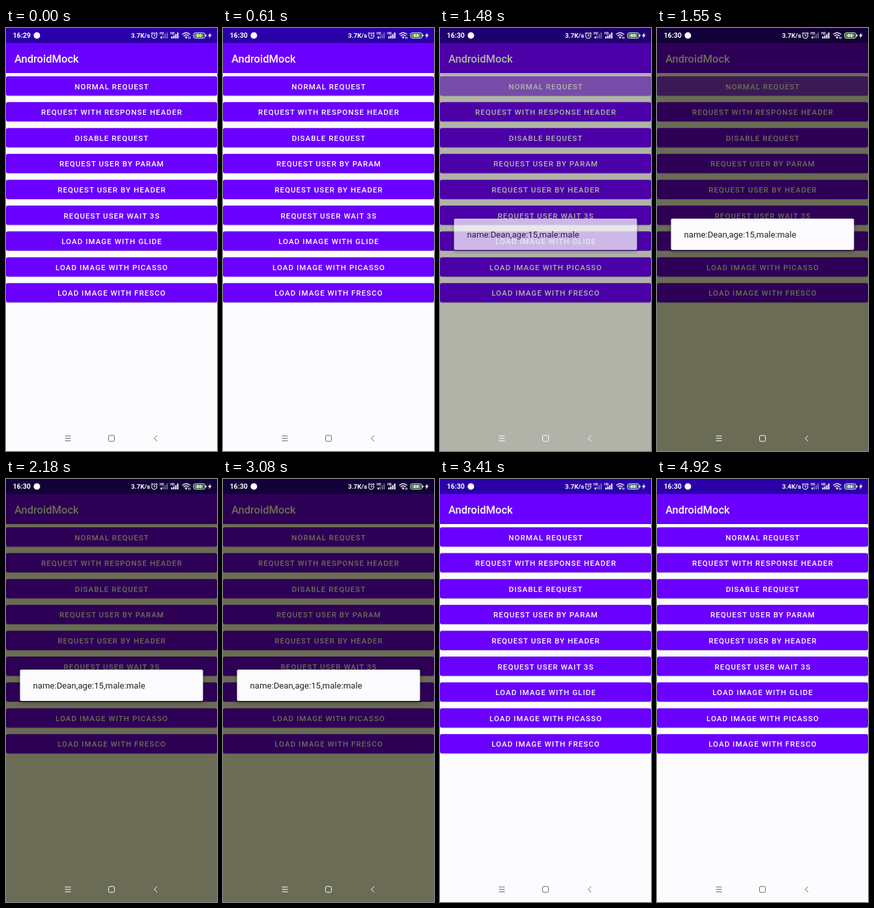
Recreate the animation shown at these times as an HTML page. Size 324 px wide and 648 px high, loop 4.97 s.

```html
<!DOCTYPE html>
<html lang="en">
<head>
<meta charset="utf-8">
<title>AndroidMock</title>
<style>
  html, body { margin: 0; width: 100%; height: 100%; overflow: hidden; background: #fcfcff; }
  svg { display: block; width: 324px; height: 648px; font-family: Roboto, Inter, sans-serif; }
  #dim { mix-blend-mode: multiply; }
  #dialog { filter: drop-shadow(0 2px 3px rgba(0, 0, 0, .45)); }
  .label { font-size: 11.55px; font-weight: 500; letter-spacing: 1.03px; text-anchor: middle; fill: #fff; }
  .line { fill: none; stroke: #fff; }
</style>
</head>
<body>
<svg viewBox="0 0 324 648">
  <rect width="324" height="648" fill="#fcfcff"/>
  <rect y="23" width="324" height="46" fill="#6a00ff"/>
  <rect width="324" height="23" fill="#2a00a8"/>
  <text x="13" y="52.5" font-size="16.5" font-weight="500" fill="#fff">AndroidMock</text>
  <g id="buttons"></g>
  <rect id="dim" width="324" height="648"/>

  <g fill="#fff">
    <text id="clock" x="10.5" y="15.3" font-size="10.6" font-weight="700"></text>
    <circle cx="47.4" cy="11.5" r="5"/>
    <text id="speed" x="192" y="15" font-size="9.9" font-weight="700"></text>
    <g class="line" stroke-width="1.1">
      <circle cx="227.7" cy="11.8" r="4"/>
      <path d="M227.7 9.3v2.7h2M222.7 8.6l2.4-2M232.7 8.6l-2.4-2"/>
    </g>
    <g id="signals"></g>
    <g class="line" stroke-width="1.4">
      <path d="M270.6 9.7q6-5 12 0M272.7 12.1q3.9-3.1 7.8 0"/>
      <path d="M274.7 14.3q1.9-1.4 3.8 0"/>
    </g>
    <path d="M274.9 14.4h3.4l-1.7 2.1zM280 13.5h1v3h-1zM282 13.5h1v3h-1z"/>
    <rect class="line" x="288" y="7.5" width="17.5" height="8" rx="2.3"/>
    <rect x="289.5" y="9" width="14" height="5" rx="1" fill="#58b83c"/>
    <rect x="306.3" y="9.7" width="1.3" height="3.6" rx=".6"/>
    <text x="296.6" y="14.1" font-size="7" font-weight="700" text-anchor="middle">86</text>
    <path d="M314 7l-4 5.2h2.5l-1 3.8 4.4-5.4h-2.6z"/>
  </g>

  <g id="nav" fill="none">
    <path d="M90.5 625h9M90.5 628.7h9M90.5 632.4h9"/>
    <rect x="157.5" y="624.2" width="9" height="9" rx="1.8"/>
    <path d="M232.2 624.3l-4.6 4.4 4.6 4.4"/>
  </g>

  <g id="dialog">
    <rect x="21.5" y="292" width="281" height="48" rx="2" fill="#fcfcff"/>
    <text x="41.5" y="321" font-size="13.2" fill="#222">name:Dean,age:15,male:male</text>
  </g>
</svg>
<script>
const LOOP = 4970;
const $ = id => document.getElementById(id);
const ramp = (t, a, b) => Math.min(1, Math.max(0, (t - a) / (b - a)));
const pulse = (t, a, b, c, d) => ramp(t, a, b) - ramp(t, c, d);

const labels = ["NORMAL REQUEST", "REQUEST WITH RESPONSE HEADER", "DISABLE REQUEST",
  "REQUEST USER BY PARAM", "REQUEST USER BY HEADER", "REQUEST USER WAIT 3S",
  "LOAD IMAGE WITH GLIDE", "LOAD IMAGE WITH PICASSO", "LOAD IMAGE WITH FRESCO"];

const box = (y, attrs) => `<rect y="${y}" width="324" height="29.5" rx="3" ${attrs}/>`;
$("buttons").innerHTML = labels.map((label, i) => {
  const y = 74 + i * 39.6;
  return box(y + 1, 'fill="#000" opacity=".25"') + box(y, 'fill="#6a00ff"') +
    (i ? "" : box(y, 'id="ripple" fill="#fff"')) +
    `<text class="label" x="162.5" y="${y + 19.6}">${label}</text>`;
}).join("");

// Two mobile signals; the first one is weak.
$("signals").innerHTML = [[236.5, 1], [252.7, 4]].map(([x, level]) =>
  `<text x="${x - .5}" y="9.8" font-size="5" font-weight="700">HD</text>` +
  [3, 4.5, 6.5, 9].map((h, i) =>
    `<rect x="${x + 1 + i * 3}" y="${16 - h}" width="2" height="${h}" opacity="${i < level ? 1 : .4}"/>`
  ).join("")).join("");

function draw(t) {
  const dim = pulse(t, 1430, 1530, 3265, 3375);
  const shade = [108, 109, 85].map(c => Math.round(255 + (c - 255) * dim));
  $("dim").setAttribute("fill", `rgb(${shade})`);
  $("dialog").setAttribute("opacity", pulse(t, 1430, 1500, 3255, 3335));
  $("ripple").setAttribute("opacity", .42 * pulse(t, 1330, 1400, 1490, 1620));
  $("nav").setAttribute("stroke", dim > .25 ? "#fff" : "#62626a");
  $("clock").textContent = t < 560 ? "16:29" : "16:30";
  $("speed").textContent = t < 3600 ? "3.7K/s" : "3.4K/s";
}

const start = performance.now();
function tick() {
  draw((performance.now() - start) % LOOP);
  requestAnimationFrame(tick);
}
tick();
</script>
</body>
</html>
```
